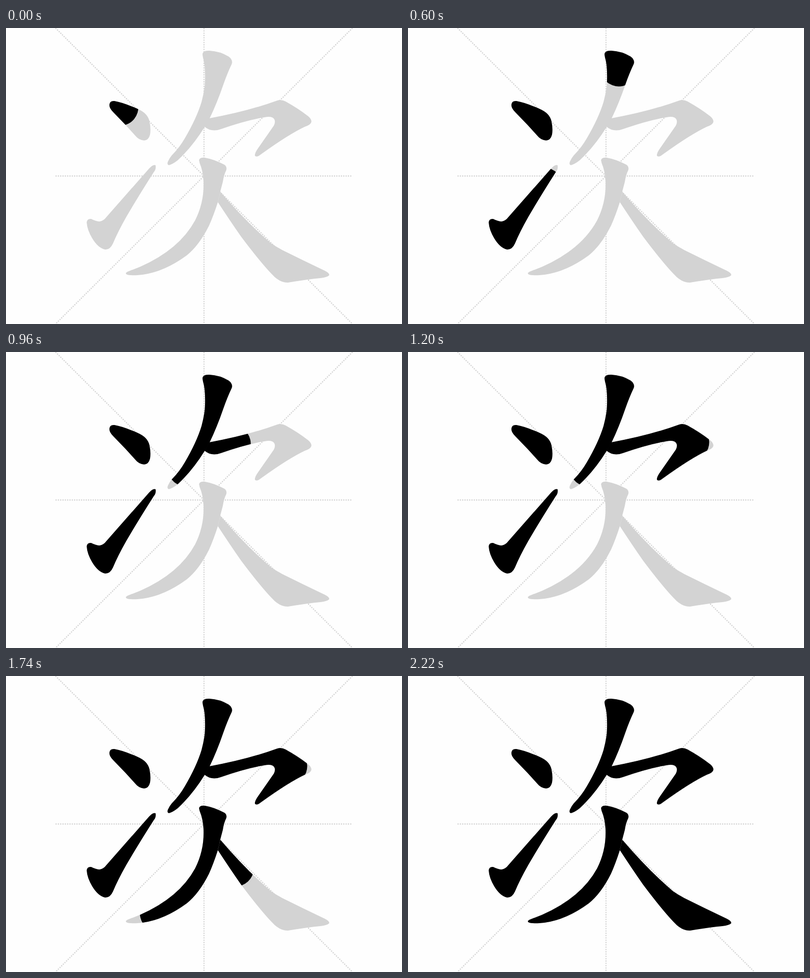
An HTML page for the animation above (2.28 s loop, 800 px wide and 600 px high).

```html
<!DOCTYPE html>
<html lang="zh">
<head>
<meta charset="utf-8">
<title>Stroke order</title>
<style>
  html, body { margin: 0; width: 100%; height: 100%; overflow: hidden; background: #fefefe; }
  svg { display: block; width: 800px; height: 600px; }
</style>
</head>
<body>
<svg viewBox="0 0 800 600">
  <g transform="translate(100) scale(2.34375)" stroke="#d3d3d3" stroke-dasharray="1 1">
    <path d="M0,0L256,256"/>
    <path d="M256,0L0,256"/>
    <path d="M128,0V256"/>
    <path d="M0,128H256"/>
  </g>
  <g id="ghost" fill="#d3d3d3"></g>
  <g id="ink" fill="none" stroke="#000" stroke-linecap="round" stroke-linejoin="round"></g>
</svg>
<script>
const LOOP = 2280, STEP = 60, SPEED = 0.85, BRUSH = 75;

// outline, brush path, start of the brush, time the whole outline is inked (ms)
const strokes = [
  { outline: 'M209,155Q210,147 219,148Q237,151 266,164Q287,173 290,190Q293,204 291,216Q288,228 279,228Q268,227 261,218L242,197L217,171Q208,162 209,155Z',
    brush: 'M214,148L230,161L268,200', start: -24, full: 540 },
  { outline: 'M289,285Q297,276 302,278Q304,286 298,293Q265,345 243,383Q226,413 216,437Q210,450 200,449Q186,446 174,426Q164,409 163,394Q164,386 172,387Q184,393 190,392Q197,391 203,383Z',
    brush: 'M170,392L188,411L200,416L215,398L274,320', start: 209, full: 900 },
  { outline: 'M397,54Q397,45 411,46Q432,47 450,58Q459,65 456,73Q447,92 439,115Q426,153 411,184Q406,193 401,201Q377,240 347,268Q337,276 329,278Q325,277 327,271Q330,264 335,258Q350,243 361,224Q385,183 395,150Q402,123 402,108Q403,75 398,60Z',
    brush: 'M405,52L426,81L415,125L395,180L364,235', start: 558, full: 1380 },
  { outline: 'M411,183Q488,169 548,147Q556,144 565,149Q590,163 608,177Q617,183 617,190Q616,196 604,200Q570,216 511,259Q506,262 503,259Q502,255 507,247L541,198Q545,190 542,185Q538,178 522,181Q485,187 434,205Q415,212 401,200Z',
    brush: 'M408,197L457,186L550,164L571,183L523,232', start: 901, full: 1800 },
  { outline: 'M390,268Q391,262 402,263Q420,266 441,277Q447,281 445,288Q440,298 438,312L433,331Q431,342 428,353Q419,381 410,401Q390,441 365,461Q320,494 276,500Q250,503 243,499Q240,496 248,493L271,484Q350,449 382,390Q401,352 399,310Q398,290 391,273Z',
    brush: 'M398,270L420,292L416,330L407,364L385,410L350,450L308,481', start: 1317, full: 2160 },
  { outline: 'M433,332Q485,393 535,436Q545,443 558,450Q600,471 644,492Q654,497 653,501Q650,505 635,507Q605,510 570,516Q557,517 543,505Q520,483 475,423Q452,390 428,353Z',
    brush: 'M430,342L463,389L510,440L556,482L618,498', start: 1672, full: 2160 }
];

function add(parent, tag, attrs) {
  const el = document.createElementNS('http://www.w3.org/2000/svg', tag);
  for (const name in attrs) el.setAttribute(name, attrs[name]);
  return parent.appendChild(el);
}

const ghost = document.getElementById('ghost');
const ink = document.getElementById('ink');

strokes.forEach((s, i) => {
  add(ghost, 'path', { d: s.outline });
  const clip = add(ink, 'clipPath', { id: 'clip' + i });
  add(clip, 'path', { d: s.outline });
  const group = add(ink, 'g', { 'clip-path': `url(#clip${i})` });
  s.line = add(group, 'path', { d: s.brush });
  s.length = s.line.getTotalLength();
});

function draw(t) {
  for (const s of strokes) {
    const shown = Math.min((t - s.start) * SPEED, s.length + 1);
    s.line.style.display = shown > 0 ? '' : 'none';
    s.line.setAttribute('stroke-dasharray', `${Math.max(shown, 0)} 2000`);
    s.line.setAttribute('stroke-width', t >= s.full ? 1200 : BRUSH);
  }
}

const begin = performance.now();
function tick() {
  const t = (performance.now() - begin) % LOOP;
  draw(Math.floor(t / STEP) * STEP);
  requestAnimationFrame(tick);
}
tick();
</script>
</body>
</html>
```
